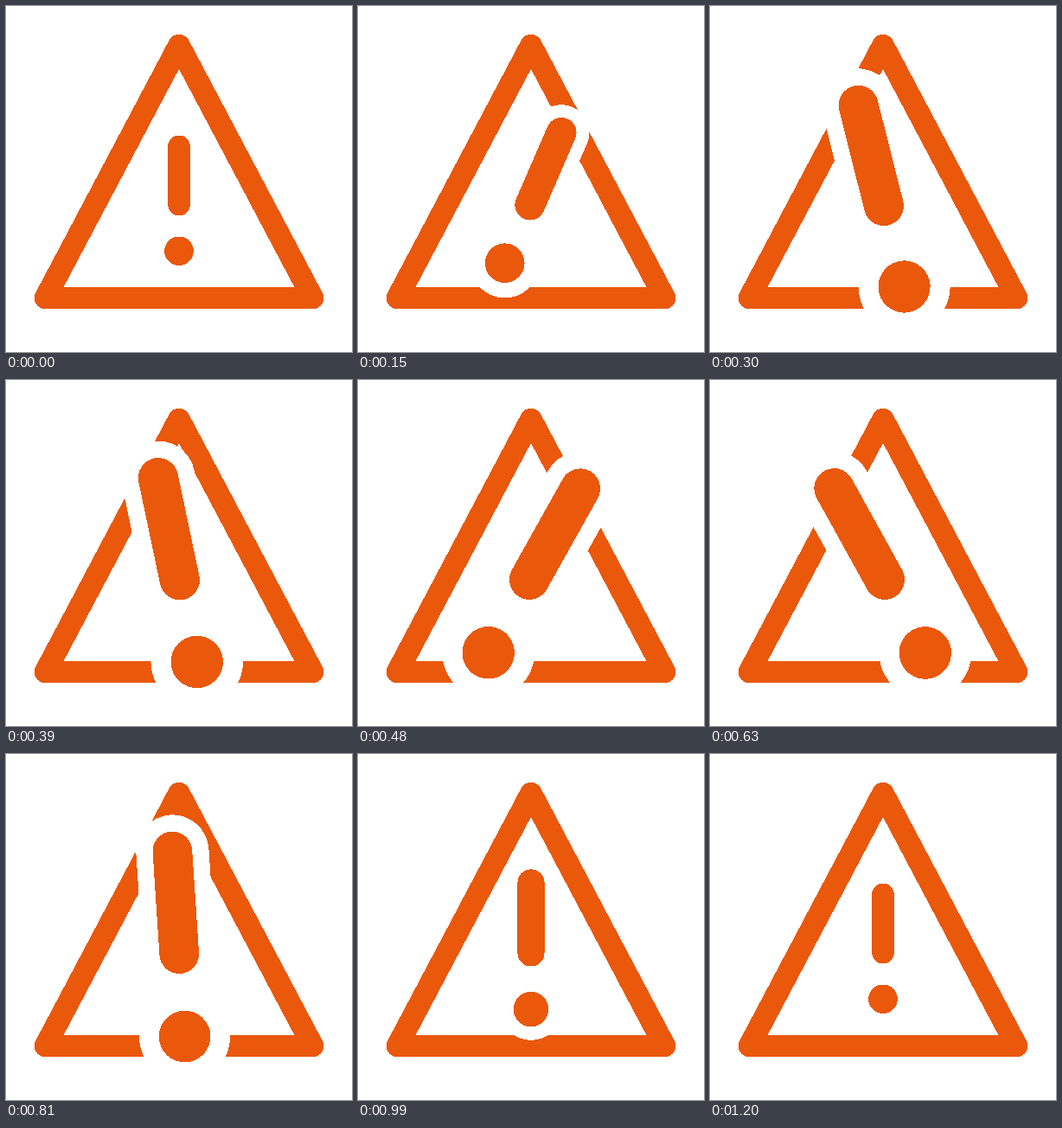
Recreate the animation shown at these times as an HTML page. Size 400 px wide and 400 px high, loop 3.23 s.

```html
<!DOCTYPE html>
<html lang="en">
<head>
<meta charset="utf-8">
<title>Warning</title>
<style>
  html, body { margin: 0; width: 100%; height: 100%; overflow: hidden; background: #fff; }
  svg { display: block; width: 100vw; height: 100vh; shape-rendering: crispEdges; }
  .line { fill: none; stroke: #ea580c; stroke-linecap: round; stroke-linejoin: round; }
  .gap { stroke: #fff; }
</style>
</head>
<body>
<svg viewBox="0 0 400 400">
  <path class="line" stroke-width="25.6" d="M200 45.5 354.5 337.5H45.5Z"/>
  <g id="mark">
    <path class="line gap" stroke-width="47.4" d="M0-64.8V2.2"/>
    <circle cy="56" r="29.6" fill="#fff"/>
    <path class="line" stroke-width="25.7" d="M0-64.8V2.2"/>
    <circle cy="56" r="16.8" fill="#ea580c"/>
  </g>
</svg>
<script>
  const LOOP = 3230, TICK = 30, LAST = 40;

  // [tick, value]
  const SCALE = [[0, 1], [10.7, 1.8], [25.9, 1.8], [36.6, 1]];
  const ANGLE = [[0, 0], [7.16, 30], [11.44, -30], [15.72, 30], [20, -30], [29, 0]];

  const mark = document.getElementById('mark');
  const ease = u => u * u * (3 - 2 * u);

  function valueAt(keys, n) {
    const i = keys.findIndex(k => k[0] > n);
    if (i < 0) return keys[keys.length - 1][1];
    const [n0, a] = keys[i - 1], [n1, b] = keys[i];
    return a + (b - a) * ease((n - n0) / (n1 - n0));
  }

  function draw(ms) {
    const n = Math.min(LAST, Math.floor((ms % LOOP) / TICK));
    const angle = valueAt(ANGLE, n), scale = valueAt(SCALE, n);
    mark.setAttribute('transform', `translate(200 227.3) rotate(${angle}) scale(${scale})`);
  }

  const start = performance.now();
  function loop(now) {
    draw(Math.max(0, now - start));
    requestAnimationFrame(loop);
  }
  draw(0);
  requestAnimationFrame(loop);
</script>
</body>
</html>
```
